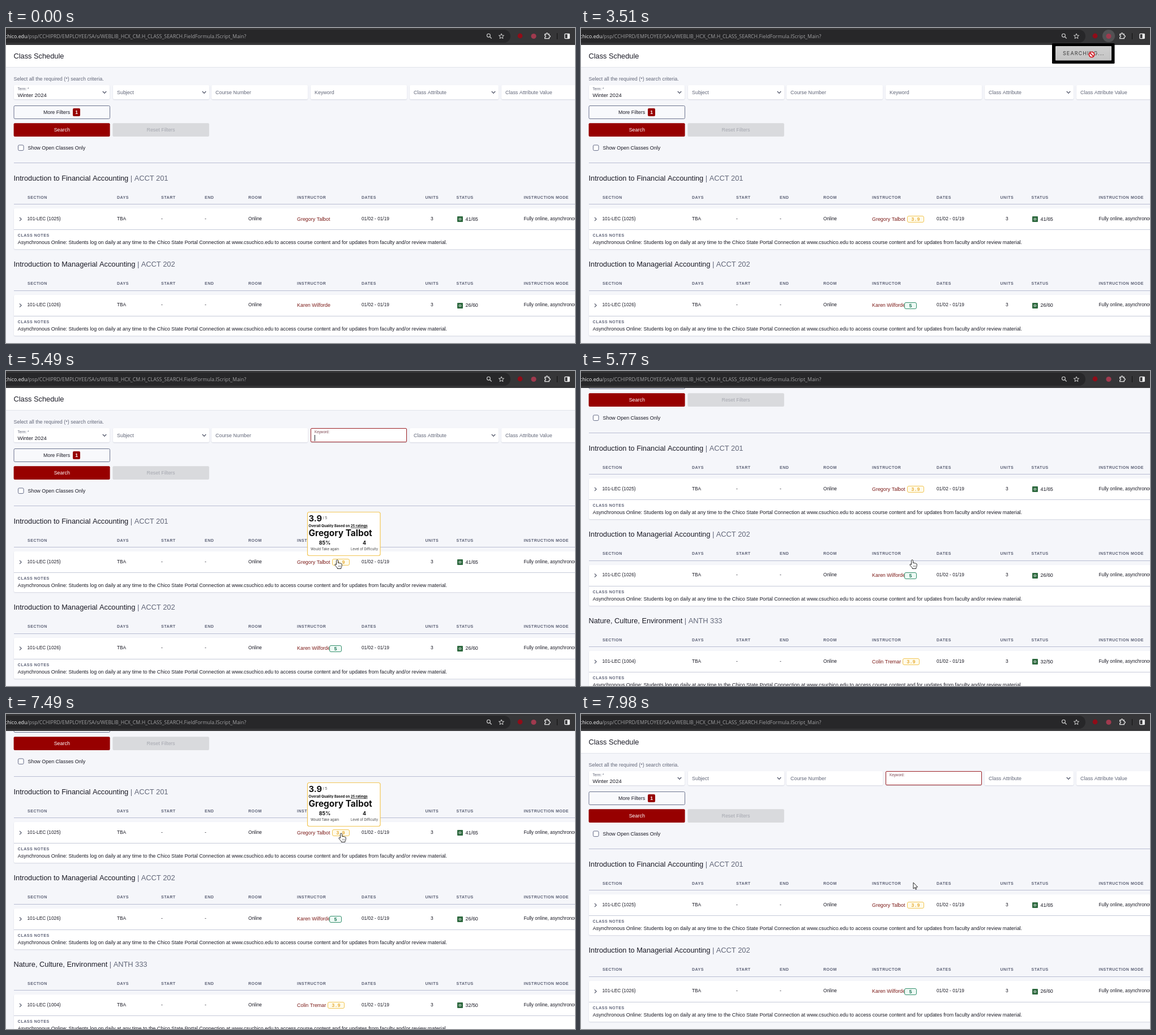
Animation of 1005 by 557 pixels, one loop 8 s. Source, as an HTML page with a canvas:

```html
<!DOCTYPE html>
<html lang="en">
<head>
<meta charset="utf-8">
<title>Class Schedule</title>
<style>
  html, body { margin: 0; width: 100%; height: 100%; overflow: hidden; background: #f5f6fa; }
  canvas { display: block; width: 1005px; height: 557px; }
</style>
</head>
<body>
<canvas id="stage" width="1005" height="557"></canvas>
<script>
const ctx = document.getElementById('stage').getContext('2d');
const W = 1005, H = 557, LOOP = 8000;
const SANS = '"Liberation Sans", Arial, sans-serif';
const UI = '"Open Sans", "Noto Sans", sans-serif';
const GEO = 'Inter, Roboto, sans-serif';
const MONO = '"Liberation Mono", monospace';
const INK = '#1b1b26', MUTED = '#626779', RULE = '#b9bdd3', RED = '#970000';

// Type sizes of the page
const TITLE = 12.8, BODY = 8.94, CELL = 8.3, HEAD = 7;

// Moments of the story, in ms
const POPUP = 1080, CLICK = 1980, RATED = 3180, FOCUS = 4085, BLINK = 537;

const rows = [
  { title: 'Introduction to Financial Accounting', code: 'ACCT 201', section: '101-LEC (1025)', who: 'Gregory Talbot',
    seats: '41/65', score: '3.9', x: 576, w: 30, count: 25, again: '85%', level: '4' },
  { title: 'Introduction to Managerial Accounting', code: 'ACCT 202', section: '101-LEC (1026)', who: 'Karen Wilforde',
    seats: '26/60', score: '5', x: 571, w: 22, count: 12, again: '100%', level: '2' },
  { title: 'Nature, Culture, Environment', code: 'ANTH 333', section: '101-LEC (1004)', who: 'Colin Tremar',
    seats: '32/50', score: '3.9', x: 568, w: 30, count: 31, again: '74%', level: '3' }
];
rows.forEach((r, i) => { r.dy = i * 152.5; r.y = Math.round(332 + r.dy); });

const heads = [['SECTION', 38], ['DAYS', 196], ['START', 274], ['END', 351], ['ROOM', 428], ['INSTRUCTOR', 514],
  ['DATES', 628], ['UNITS', 740.5], ['STATUS', 795.5], ['INSTRUCTION MODE', 914.5]];

// Pointer path: time, x, y
const path = [
  [60, 872, 560], [420, 915, 290], [700, 960, 70], [870, 929, 13], [1150, 929, 13], [1560, 913, 44],
  [2000, 913, 44], [2110, 911, 45], [3490, 911, 45], [3500, 902, 47], [3575, 902, 47], [3950, 620, 112],
  [4110, 608, 114], [4270, 587, 285], [4420, 585, 334.5], [5840, 585, 334.5], [6100, 584, 356],
  [6330, 584, 356], [6700, 584, 512], [7060, 584, 512], [7420, 592, 211.5], [7620, 592, 211.5],
  [7840, 588, 290], [7960, 587, 298], [LOOP, 587, 298]
];

const HAND = new Path2D('M-1.5 8V1Q-1.5-.5 0-.5Q1.5-.5 1.5 1V5Q3 4.3 4 5.3Q5.6 4.8 6.3 6Q8 5.8 8.2 7.2V10Q8 12 6.8 13.5V15H.2V13.5Q-2 11.5-4 8.6Q-4.3 7-3 7Q-2.2 7.2-1.5 8Z');
const ARROW = new Path2D('M0 0V11L2.5 8.7L4.2 12.3L5.7 11.6L4.1 8.2L7.6 8Z');
const PUZZLE = new Path2D('M951.7 11H954V10.4A1.5 1.5 0 0 1 957 10.4V11H959.3V13.3H959.8A1.5 1.5 0 0 1 959.8 16.3H959.3V18.6H951.7V16.4A1.6 1.6 0 0 0 951.7 13.2Z');

const ease = u => u * u * (3 - 2 * u);
const ramp = (t, a, b) => ease(Math.min(1, Math.max(0, (t - a) / (b - a))));
const inside = (p, x, y, w, h) => p.x >= x && p.x <= x + w && p.y >= y && p.y <= y + h;

// y is the middle of the capitals
function text(s, x, y, size, color, { font = SANS, weight = 400, gap = 0, align = 'left' } = {}) {
  ctx.font = `${weight} ${size}px ${font}`;
  ctx.letterSpacing = gap + 'px';
  ctx.textAlign = align;
  ctx.fillStyle = color;
  ctx.fillText(s, x, Math.round(y + size * 0.358));
  return ctx.measureText(s).width;
}

function box(x, y, w, h, r, fill, stroke, line = 1) {
  ctx.beginPath();
  ctx.roundRect(x, y, w, h, r);
  if (fill) { ctx.fillStyle = fill; ctx.fill(); }
  if (stroke) { ctx.strokeStyle = stroke; ctx.lineWidth = line; ctx.stroke(); }
}

function card(x, y, w, h) {
  ctx.save();
  ctx.shadowColor = 'rgba(60,70,110,.18)';
  ctx.shadowBlur = 2;
  ctx.shadowOffsetY = 1;
  box(x, Math.round(y), w, h, 2, '#fff');
  ctx.restore();
}

function disc(x, y, r, fill) {
  ctx.beginPath();
  ctx.arc(x, y, r, 0, 7);
  ctx.fillStyle = fill;
  ctx.fill();
}

function ring(x, y, r, color, width) {
  ctx.beginPath();
  ctx.arc(x, y, r, 0, 7);
  ctx.strokeStyle = color;
  ctx.lineWidth = width;
  ctx.stroke();
}

function lines(points, color, width = 1) {
  ctx.beginPath();
  points.forEach(([x, y]) => ctx.lineTo(x, y));
  ctx.strokeStyle = color;
  ctx.lineWidth = width;
  ctx.stroke();
}

const rule = (x, y, color) => { ctx.fillStyle = color; ctx.fillRect(x, Math.round(y), W - x, 1); };

function pointerAt(t) {
  if (t < path[0][0]) return { x: 872, y: 600 };
  const i = path.findIndex(k => k[0] > t);
  const [ta, xa, ya] = path[i - 1], [tb, xb, yb] = path[i];
  const u = ramp(t, ta, tb);
  return { x: xa + (xb - xa) * u, y: ya + (yb - ya) * u };
}

function scrollAt(t) {
  if (t < 7060) return Math.round(129 * ramp(t, 5500, 5765));
  return Math.round(128 * (1 - ramp(t, 7530, 7840)));
}

function drawFilters(t) {
  box(0, 30, W, 39, 0, '#fff');
  rule(0, 69, '#e1e3ea');
  text('Class Schedule', 13.5, 49, TITLE, INK);
  text('Select all the required (*) search criteria.', 13.5, 89.5, BODY, MUTED);

  const fields = [[14, 169], [189, 170, 'Subject'], [363, 170, 'Course Number'], [538, 170, 'Keyword'],
    [713, 157, 'Class Attribute'], [875, 140, 'Class Attribute Value']];
  const focused = t >= FOCUS;
  for (const [x, w, label] of fields) {
    card(x, 101, w, 25);
    if (label && !(focused && label === 'Keyword')) text(label, x + 7, 114, BODY, MUTED);
  }
  text('Term: *', 20.5, 107.5, 6.3, MUTED);
  text('Winter 2024', 20.5, 119, 9.5, INK);
  for (const x of [174, 350, 861]) lines([[x - 3.2, 112], [x, 115.4], [x + 3.2, 112]], '#4c5165', 1.2);
  if (focused) {
    box(538.5, 101.5, 169, 24, 1.5, '#fff', '#9e2226');
    text('Keyword:', 545, 107.5, 6.3, '#7d4550');
    if (Math.floor((t - FOCUS) / BLINK) % 2 === 0) { ctx.fillStyle = INK; ctx.fillRect(545, 113, 1, 11); }
  }

  box(14, 137.5, 169.5, 23, 2, '#f8f9fc', '#6d758f');
  text('More Filters', 66, 149, BODY, INK);
  box(118, 142, 13, 14, 2, RED);
  text('1', 124.5, 149, 8.5, '#fff', { weight: 700, align: 'center' });
  box(13.6, 168.2, 170, 23.8, 2, RED);
  text('Search', 98.8, 180, BODY, '#fff', { align: 'center' });
  box(188.4, 168.2, 170.4, 23.8, 2, '#d9dadd');
  text('Reset Filters', 273.5, 180, BODY, '#a6a8b0', { align: 'center' });
  box(21.5, 207, 9.6, 9.6, 2, '#fff', '#666d88');
  text('Show Open Classes Only', 38.5, 211.5, BODY, INK);
  rule(14, 238, RULE);
}

function drawBadge(r, hot) {
  const top = r.score === '5';
  const [edge, fill, ink] = top ? ['#35906d', '#eefaf5', '#23795a'] : ['#f2c656', '#fffbea', '#e9b040'];
  box(r.x + .5, r.y + .5, r.w - 1 + (hot ? 1 : 0), 11, 2.5, fill, edge);
  text(r.score, r.x + r.w / 2, r.y + 6, 8.6, ink, { font: MONO, weight: 700, align: 'center' });
}

function drawClass(r, rated, hot) {
  const at = y => y + r.dy;
  const small = { weight: 700, gap: .55 };
  const w = text(r.title, 13.5, at(265.2), TITLE, INK);
  text(' | ' + r.code, 13.5 + w, at(265.2), TITLE, MUTED);
  for (const [s, x] of heads) text(s, x, at(299), HEAD, '#5b6075', small);
  rule(14, at(311), RULE);
  card(14, at(319), 1000, 72);
  rule(14, at(356), '#c6cad9');
  const mid = at(338);
  lines([[24, mid - 3.2], [27.2, mid], [24, mid + 3.2]], '#4c5165', 1.1);

  const cells = [[r.section, 37.5], ['TBA', 196], ['-', 274], ['-', 351], ['Online', 428],
    ['01/02 - 01/19', 628], ['3', 750], ['Fully online, asynchronous', 914.5]];
  for (const [s, x] of cells) text(s, x, at(337), CELL, INK);
  text(r.who, 514, at(337.6), BODY, '#7c1b18');
  box(797, Math.round(at(333)), 10, 10, 1, '#2f6a40');
  text('O', 802, at(338), 6.2, '#fff', { weight: 700, align: 'center' });
  text(r.seats, 811.5, at(337.6), BODY, INK);
  text('CLASS NOTES', 20.8, at(366.5), HEAD, '#5b6075', small);
  text('Asynchronous Online: Students log on daily at any time to the Chico State Portal Connection at ' +
    'www.csuchico.edu to access course content and for updates from faculty and/or review material.',
    20.8, at(379), BODY, INK);
  if (rated) drawBadge(r, hot);
}

function drawTip(r) {
  const x = Math.round(r.x + r.w / 2 - 59), y = r.y - 83;
  const bold = { font: GEO, weight: 700 }, mid = { font: GEO, align: 'center' };
  const edge = r.score === '5' ? '#35906d' : '#f2c656';
  box(x + .5, y + .5, 128.5, 77, 3, '#fff', edge, 1.2);
  const sw = text(r.score, x + 2.5, y + 12, 14.8, '#111', bold);
  text('/ 5', x + 4 + sw, y + 11, 6.2, '#444', { font: GEO });
  const lw = text('Overall Quality Based on ', x + 2.5, y + 25, 6.1, '#111', bold);
  const cw = text(r.count + ' ratings', x + 2.5 + lw, y + 25, 6.1, '#111', bold);
  ctx.fillRect(x + 2.5 + lw, y + 28, cw, .7);
  text(r.who, x + 2.5, y + 37.5, 15.4, '#111', bold);
  text(r.again, x + 31, y + 55, 9, '#111', { ...mid, weight: 700 });
  text(r.level, x + 101, y + 55, 9, '#111', { ...mid, weight: 700 });
  text('Would Take again', x + 31, y + 66, 6, '#444', mid);
  text('Level of Difficulty', x + 101, y + 66, 5.8, '#444', mid);
}

function drawToolbar(t) {
  box(0, 0, W, 30, 0, '#363638');
  box(-20, 3, 911, 23, 11.5, '#272729');
  const w = text('chico.edu', -2, 14.5, 8.8, '#f0f0f0', { font: UI });
  text('/psp/CCHIPRD/EMPLOYEE/SA/s/WEBLIB_HCX_CM.H_CLASS_SEARCH.FieldFormula.IScript_Main?',
    -2 + w, 14.5, 8.8, '#a0a0a2', { font: UI });

  ring(852.4, 13.2, 2.9, '#d4d4d4', 1.1);
  lines([[854.5, 15.4], [857.6, 18.5]], '#d4d4d4', 1.3);
  const star = [];
  for (let i = 0; i <= 10; i++) {
    const a = i * Math.PI / 5 - Math.PI / 2, r = i % 2 ? 2.1 : 4.8;
    star.push([875 + r * Math.cos(a), 14.7 + r * Math.sin(a)]);
  }
  lines(star, '#d4d4d4', 1);

  if (t >= 830 && t < 4340) disc(932, 14, 11, '#525254');
  disc(908, 14, 4.4, '#900c18');
  disc(932, 14.5, 4.6, '#a03a4e');
  ctx.strokeStyle = '#e6e6e6';
  ctx.lineWidth = 1.3;
  ctx.stroke(PUZZLE);
  ctx.fillStyle = '#111';
  ctx.fillRect(973, 9, 1, 11);
  box(986.9, 10.4, 8.2, 8.2, 1, null, '#f2f2f2', 1.3);
  ctx.fillStyle = '#f2f2f2';
  ctx.fillRect(991.5, 10, 4, 9);
}

function drawPopup(t) {
  const busy = t >= CLICK;
  box(832, 27, 110.5, 36, 1.5, '#000');
  const g = ctx.createLinearGradient(0, 32, 0, 58);
  g.addColorStop(0, busy ? '#cfcfcf' : '#d2d2d2');
  g.addColorStop(1, busy ? '#c4c4c4' : '#b7b7b7');
  if (busy) box(838, 32, 99, 25.5, 1, g);
  else box(837, 31.5, 101, 26, 1, g);
  text(busy ? 'SEARCHING...' : 'GET RATINGS', 851, 44.5, 9, busy ? '#3d3d3d' : '#2b2b2b', { font: GEO, gap: 1.1 });
}

function drawPointer(p, kind) {
  ctx.save();
  ctx.translate(p.x, p.y);
  if (kind === 'stop') {
    disc(0, 0, 5.6, '#fff');
    ring(0, 0, 4.6, '#d01820', 1.9);
    lines([[-3.2, -3.2], [3.2, 3.2]], '#d01820', 1.9);
  } else if (kind === 'beam') {
    lines([[-2, -6], [2, -6]], INK);
    lines([[0, -6], [0, 6]], INK);
    lines([[-2, 6], [2, 6]], INK);
  } else {
    const shape = kind === 'hand' ? HAND : ARROW;
    ctx.fillStyle = '#fff';
    ctx.strokeStyle = '#111';
    ctx.lineWidth = .9;
    ctx.lineJoin = 'round';
    ctx.fill(shape);
    ctx.stroke(shape);
    if (kind === 'hand') for (const x of [2.2, 4, 5.8]) lines([[x, 9.3], [x, 12.2]], '#555', .6);
  }
  ctx.restore();
}

function render(t) {
  const p = pointerAt(t), scroll = scrollAt(t);
  const pagePoint = { x: p.x, y: p.y + scroll };
  const rated = t >= RATED, popup = t >= POPUP && t < FOCUS;
  const hot = rated && rows.find(r => inside(pagePoint, r.x, r.y - 1, r.w, 14));

  let kind = 'arrow';
  if (popup && inside(p, 837, 32, 101, 26)) kind = t < CLICK ? 'hand' : 'stop';
  else if (hot || (t > 5490 && t < 5840)) kind = 'hand';
  else if (!popup && inside(pagePoint, 538, 101, 170, 25)) kind = 'beam';

  ctx.fillStyle = '#f5f6fa';
  ctx.fillRect(0, 0, W, H);
  ctx.save();
  ctx.translate(0, -scroll);
  drawFilters(t);
  for (const r of rows) drawClass(r, rated, r === hot);
  if (hot) drawTip(hot);
  ctx.restore();

  drawToolbar(t);
  if (popup) drawPopup(t);
  drawPointer(p, kind);
}

const start = performance.now();
function tick() {
  render((performance.now() - start) % LOOP);
  requestAnimationFrame(tick);
}
tick();
</script>
</body>
</html>
```
